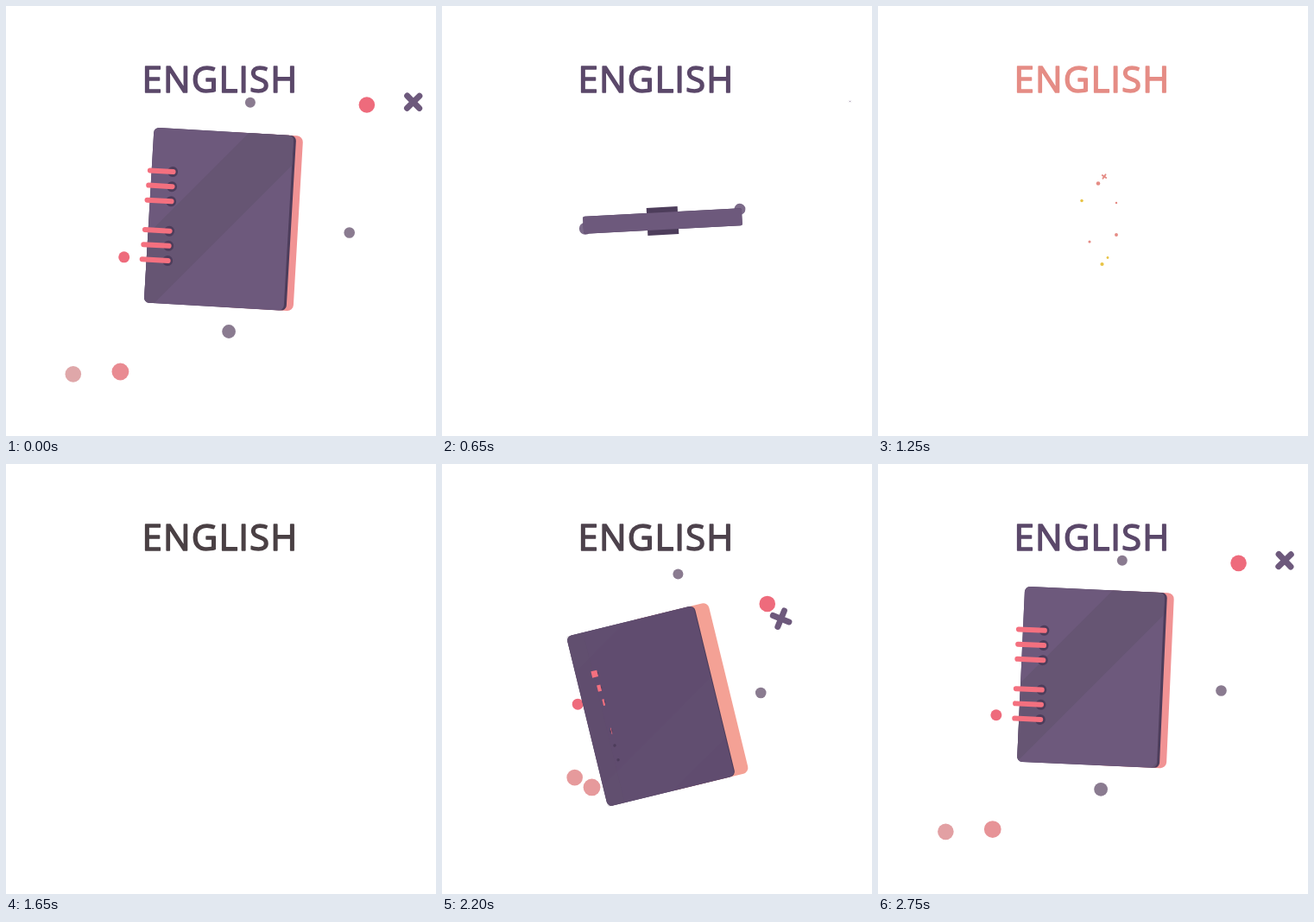
These frames come from a looping animation (498 by 498 pixels, 2800 ms). An HTML page with a canvas:

```html
<!DOCTYPE html>
<html lang="en">
<head>
<meta charset="utf-8">
<title>English</title>
<style>
html, body { margin: 0; width: 100%; height: 100%; overflow: hidden; background: #fff; }
canvas { display: block; }
</style>
</head>
<body>
<canvas id="stage" width="498" height="498"></canvas>
<script>
const ctx = document.getElementById('stage').getContext('2d');
const LOOP = 2800, STEP = 50;
// One cycle runs from the empty stage at 1500 through the loop point to 4300.
const CYCLE_START = 1500, BOOK_IN = 1830, BAR = 3450, BOOK_OUT = 3900;

const INK = [74, 64, 68], VIOLET = [91, 72, 106], CORAL = [229, 140, 133];
const NAVY = [82, 63, 97], PLUM = [109, 89, 124], DEEP = [77, 61, 91], PLUM_GREY = [124, 107, 138];
const PEACH = [246, 174, 149], ROSE = [241, 147, 148];
const DUSK = [138, 95, 108], GREY = [138, 123, 144], RED = [238, 107, 124];
const BLUSH = [230, 154, 156], ASH = [207, 195, 198], YELLOW = [232, 196, 70];

const clamp = (v, a = 0, b = 1) => Math.min(b, Math.max(a, v));
const ramp = (t, a, b) => clamp((t - a) / (b - a));
const smooth = (t, a, b) => { const u = ramp(t, a, b); return u * u * (3 - 2 * u); };
const mix = (a, b, u) => a.map((v, i) => v + (b[i] - v) * u);
const rgb = c => `rgb(${c.map(Math.round).join(',')})`;

function disc(x, y, r, color) {
  if (r <= 0) return;
  ctx.fillStyle = rgb(color);
  ctx.beginPath();
  ctx.arc(x, y, r, 0, 7);
  ctx.fill();
}
function panel(x, y, w, h, r, color) {
  if (w <= 0 || h <= 0) return;
  ctx.fillStyle = rgb(color);
  ctx.beginPath();
  ctx.roundRect(x, y, w, h, Math.min(r, w / 2, h / 2));
  ctx.fill();
}
function line(x1, y1, x2, y2, width, color, cap = 'round') {
  ctx.strokeStyle = rgb(color);
  ctx.lineWidth = width;
  ctx.lineCap = cap;
  ctx.beginPath();
  ctx.moveTo(x1, y1);
  ctx.lineTo(x2, y2);
  ctx.stroke();
}
function cross(x, y, size, degrees, color) {
  if (size <= 0) return;
  ctx.save();
  ctx.translate(x, y);
  ctx.rotate(degrees * Math.PI / 180);
  line(-size, 0, size, 0, size * 0.7, color);
  line(0, -size, 0, size, size * 0.7, color);
  ctx.restore();
}

function drawTitle(t) {
  const ink = mix(INK, VIOLET, smooth(t, 2000, 2700));
  const coral = mix(ink, CORAL, smooth(t, 3600, 4020));
  ctx.font = '42px "Open Sans", sans-serif';
  ctx.letterSpacing = '1.1px';
  ctx.lineJoin = 'round';
  ctx.lineWidth = 1.5;
  ctx.fillStyle = ctx.strokeStyle = rgb(mix(coral, INK, smooth(t, 4050, 4450)));
  ctx.fillText('ENGLISH', 157.5, 100);
  ctx.strokeText('ENGLISH', 157.5, 100);
}

// In order of leaving: rest point, drift direction, radius, early and late color.
const DOTS = [
  { x: 283, y: 111.5, dx: -3, dy: 5, r: 6, from: GREY, to: GREY },
  { x: 136.5, y: 291, dx: 6.5, dy: -4, r: 6.5, from: RED, to: RED },
  { x: 398, y: 262.5, dx: -9, dy: 0.8, r: 6.3, from: GREY, to: GREY },
  { x: 258, y: 377.3, dx: 2, dy: -9, r: 7.9, from: GREY, to: GREY },
  { x: 132, y: 424, dx: 13, dy: -15.5, r: 9.9, from: BLUSH, to: RED },
  { x: 418.3, y: 114, dx: -13, dy: 15, r: 9.3, from: RED, to: RED },
  { x: 77, y: 427, dx: 24, dy: -20, r: 9.3, from: BLUSH, to: ASH },
  { x: 472.5, y: 110.5, dx: -25, dy: 21.5, r: 10, from: PLUM, to: PLUM, cross: true }
];

function drawDots(t) {
  const drift = (clamp(3300 - t, 0, 1400) / 900) ** 5.79;
  const grow = ramp(t, 1900, 1990);
  DOTS.forEach((dot, i) => {
    const size = dot.r * grow * (1 - ramp(t, LOOP, LOOP + 420 + 35 * i) ** 3);
    const x = dot.x + dot.dx * drift, y = dot.y + dot.dy * drift;
    const late = mix(dot.from, dot.to, smooth(t, 2650, 3050));
    const color = mix(DUSK, late, smooth(t, 2000, 2150));
    if (dot.cross) cross(x, y, size, 45 + 21 * drift, color);
    else disc(x, y, size, color);
  });
}

function drawSheen(t, left, top, width, height) {
  const start = 418 + 0.2 * (t - 2750);
  ctx.save();
  ctx.beginPath();
  ctx.roundRect(left, top, width, height, 6);
  ctx.clip();
  ctx.setTransform(1, 0, 0, 1, 0, 0);
  ctx.globalAlpha = ramp(t, 2150, 2350) * (1 - ramp(t, 3200, 3400));
  for (const k of [start, start + 250]) line(k + 44, 0, k - 454, 498, 62, [102, 85, 115], 'butt');
  ctx.restore();
}

function drawRings(t, left) {
  const hole = 6 * smooth(t, 2130, 2330) * (1 - ramp(t, 2800, 2960));
  for (let i = 0; i < 6; i++) {
    const y = (i - 2.5) * 17.2 + (i < 3 ? -8.6 : 8.6);
    const out = smooth(t, 2150 + i * 12, 2310 + i * 12) * (1 - ramp(t, 2760 + i * 8, 3130 + i * 12));
    const length = 30 * out, round = length > 14;
    disc(left + 24.5, y, hole, DEEP);
    if (length > 0.5)
      line(left + 25, y, left + 25 - length, y, round ? 6 : 7.5, [244, 112, 127], round ? 'round' : 'butt');
  }
}

function drawRibbon(t, left) {
  ctx.save();
  ctx.globalAlpha = ramp(t, 1920, 1980) * (1 - ramp(t, 2040, 2140));
  ctx.strokeStyle = rgb(PEACH);
  ctx.lineWidth = 6;
  ctx.lineCap = 'round';
  ctx.beginPath();
  ctx.moveTo(left, -86);
  ctx.quadraticCurveTo(left - 11, -82, left - 14, -68);
  ctx.stroke();
  line(left + 4, 99, left + 6, 108, 2, PEACH);
  ctx.restore();
}

// The book swings in and settles, then swings out until it is seen edge-on as a bar.
function drawBook(t) {
  if (t <= BOOK_IN || t >= BOOK_OUT) return;
  const settle = Math.max(0, (2750 - t) / 750) ** 2.25;
  const leave = ramp(t, 2700, BAR) ** 2.25;
  const shrink = ramp(t, BAR, BOOK_OUT);

  const pages = (8 + 33 * settle ** 2) * (1 - ramp(t, 2800, 3000));
  const width = Math.max(20, 165 - 51 * settle ** 2 - 146 * leave ** 2);
  const height = 203 - 19 * leave ** 2;
  const left = -width / 2, top = -height / 2;
  const radius = 6 - 4 * leave;
  const edge = 3 * smooth(t, 2100, 2350) * (1 - ramp(t, 2830, 3030));
  const scale = smooth(t, BOOK_IN, 1990) * (1 - shrink ** 2);
  const color = mix(mix(NAVY, PLUM, smooth(t, 2000, 2400)), CORAL, shrink);

  ctx.save();
  ctx.translate(248 - 24 * settle ** 2 + 7.5 * leave ** 2,
    247 + 62 * settle + 10 * settle ** 2 - 18 * leave * (1 - leave) + 2 * leave);
  ctx.rotate((2.4 - 32.4 * settle + 84.6 * leave + 38 * shrink) * Math.PI / 180);
  ctx.scale(scale, scale);
  drawRibbon(t, left);

  const hub = smooth(t, 3360, BAR);
  panel(-16 * hub, -18, 32 * hub, 36, 0, DEEP);
  disc(4, 90, 7 * hub, PLUM_GREY);
  disc(-9, -90, 6.5 * hub, PLUM_GREY);

  if (pages > 0.2) panel(0, top, width / 2 + pages, height, 7, mix(PEACH, ROSE, smooth(t, 2000, 2400)));
  panel(left, top, width, height, radius, DEEP);
  panel(left, top, width - edge, height, radius, color);
  drawSheen(t, left, top, width - edge, height);

  ctx.globalAlpha = 1 - smooth(t, 2050, 2250);
  panel(left, top, 20, height, 2, [98, 83, 104]);
  ctx.globalAlpha = 1;
  drawRings(t, left);
  ctx.restore();
}

const SPARKS = [[-1, -43.5], [3.5, 50], [20, 16], [-20, -23.5], [-11, 24], [10, 42.5], [20, -21]];

function drawSparks(t) {
  const size = smooth(t, 3890, 4020) * (1 - smooth(t, 4080, 4270));
  const spread = 1 + (t - 4050) * 0.0004;
  SPARKS.forEach(([x, y], i) =>
    disc(256 + x * spread, 249 + y * spread, (2.3 - 0.18 * i) * size, i % 2 ? YELLOW : CORAL));
  cross(256 + 6 * spread, 249 - 51.5 * spread, 2.7 * size, 35, CORAL);
}

function draw(now) {
  const time = Math.floor((now % LOOP) / STEP) * STEP;
  const t = time < CYCLE_START ? time + LOOP : time;
  ctx.fillStyle = '#fff';
  ctx.fillRect(0, 0, 498, 498);
  drawDots(t);
  drawBook(t);
  drawSparks(t);
  drawTitle(t);
}

let origin;
function tick(now) {
  origin ??= now;
  draw(now - origin);
  requestAnimationFrame(tick);
}
draw(0);
requestAnimationFrame(tick);
</script>
</body>
</html>
```
